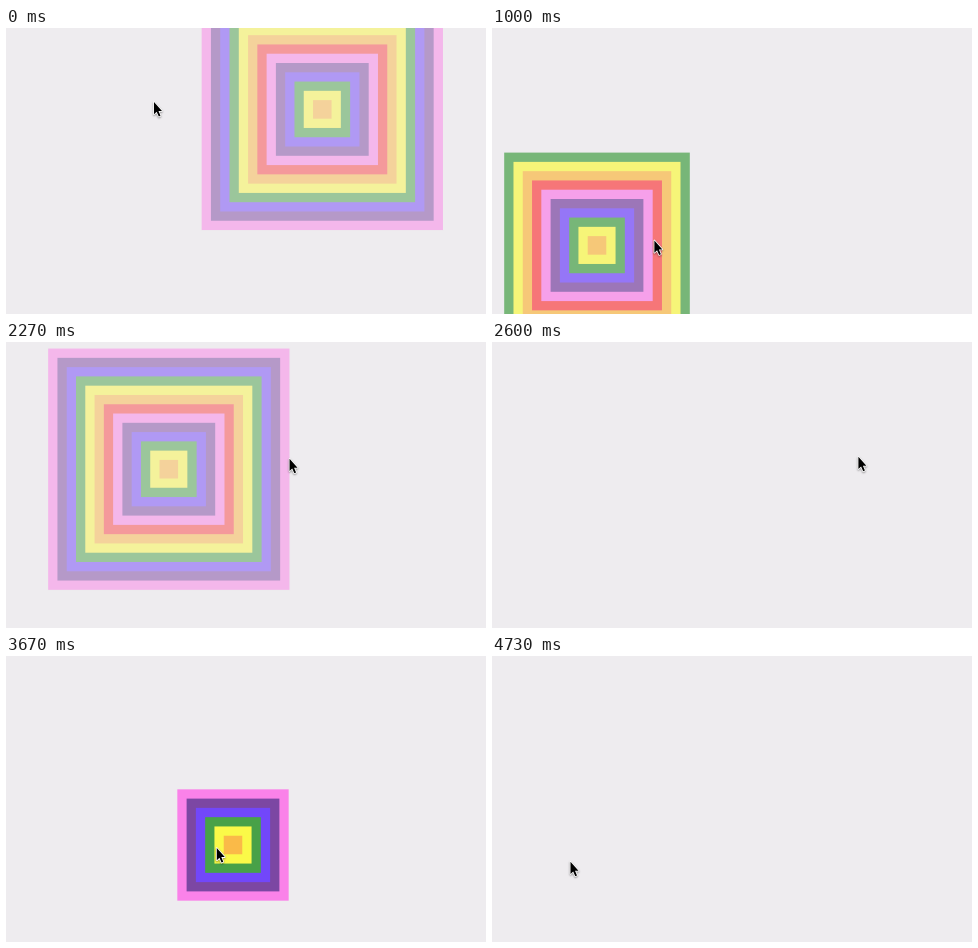
These frames come from a looping animation (480x286 px, 4.87 s). An HTML page with a canvas:

```html
<!DOCTYPE html>
<html lang="en">
<head>
<meta charset="utf-8">
<title>Rainbow clicks</title>
<style>
html, body { margin: 0; width: 100%; height: 100%; overflow: hidden; background: #eeecef; }
canvas { display: block; }
</style>
</head>
<body>
<canvas id="stage" width="480" height="286"></canvas>
<script>
const ctx = document.getElementById('stage').getContext('2d');
const LOOP = 4870;
const TICK = 200 / 3; // the picture changes 15 times a second
const REST = 2; // ticks the pointer waits before it clicks
const UNIT = 9.28;
const MAX_RINGS = 20;
const RINGS_PER_TICK = 4;
const BG = '#eeecef';
const COLORS = ['#ffa500', '#ffff00', '#008000', '#3c00ff', '#4b0082', '#ff55e6', '#ff0000'];

// Each click, and the point that bends the pointer's way to the next one
const clicks = [
  { start: -3.25, at: [316.3, 81.4], bend: [227, 55] },
  { start: 3, at: [117.8, 80], bend: [110, 150] },
  { start: 12.5, at: [105, 217.4], bend: [190, 206] },
  { start: 21, at: [286.8, 218.2], bend: [150, 115] },
  { start: 30.75, at: [162.8, 127.2], bend: [367, 108] },
  { start: 40.75, at: [366.4, 114.8], bend: [477, 199] },
  { start: 53.5, at: [227, 189], bend: [83, 217] },
  { start: 65.75, at: [78.5, 205.7] }
];

const arrow = new Path2D('M0 0V12.2L2.7 9.7 4.8 14.5 6.5 13.7 4.5 9H8Z');

const smooth = u => u * u * (3 - 2 * u);

function pointerAt(tick) {
  const i = clicks.findLastIndex(c => c.start <= tick);
  const { start, at, bend } = clicks[i];
  const next = clicks[i + 1];
  if (!next) return at;
  const e = smooth(Math.min(1, (tick - start) / (next.start - REST - start)));
  return at.map((p, k) =>
    (1 - e) ** 2 * p + 2 * e * (1 - e) * bend[k] + e * e * next.at[k]);
}

function square([x, y], units, color) {
  const half = units * UNIT;
  ctx.fillStyle = color;
  ctx.fillRect(x - half, y - half, half * 2, half * 2);
}

function drawBurst(tick, { start, at }) {
  const rings = Math.floor((tick - start) * RINGS_PER_TICK);
  if (rings < 1 || rings >= MAX_RINGS) return;
  for (let i = rings; i > 0; i--) square(at, i, COLORS[(i - 1) % COLORS.length]);
  // Veil the burst so that it fades as it grows
  ctx.globalAlpha = rings / MAX_RINGS;
  square(at, rings + 0.1, BG);
  ctx.globalAlpha = 1;
}

function drawPointer([x, y]) {
  ctx.save();
  ctx.translate(x, y);
  ctx.lineJoin = 'round';
  ctx.lineWidth = 1.6;
  ctx.strokeStyle = '#fff';
  ctx.shadowColor = 'rgba(0, 0, 0, .4)';
  ctx.shadowBlur = 2;
  ctx.shadowOffsetY = 1;
  ctx.stroke(arrow);
  ctx.shadowColor = 'transparent';
  ctx.fillStyle = '#000';
  ctx.fill(arrow);
  ctx.restore();
}

function render() {
  const tick = Math.floor((performance.now() % LOOP + 4) / TICK);
  ctx.fillStyle = BG;
  ctx.fillRect(0, 0, 480, 286);
  clicks.forEach(c => drawBurst(tick, c));
  drawPointer(pointerAt(tick));
  requestAnimationFrame(render);
}
render();
</script>
</body>
</html>
```
